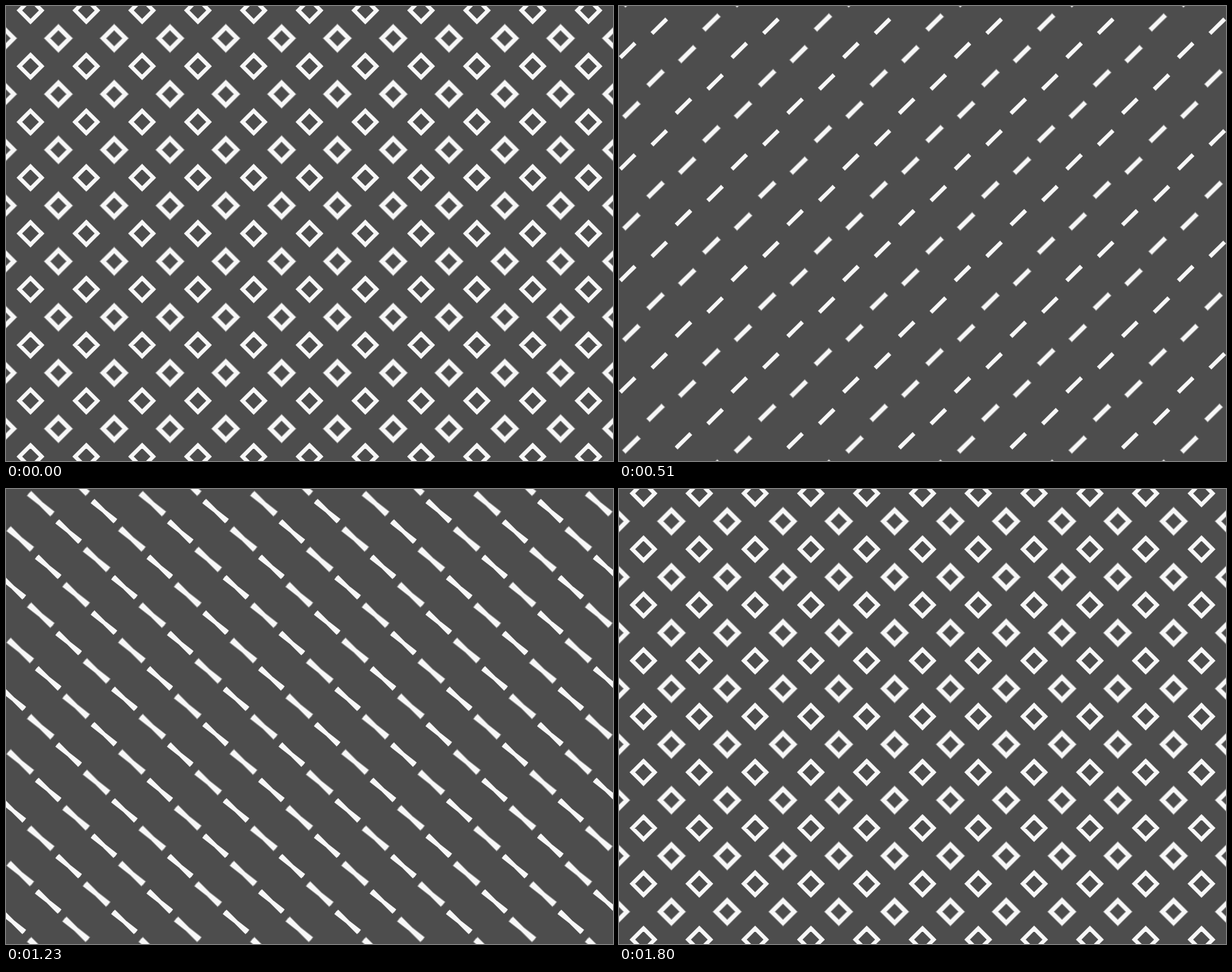
These frames come from a looping animation (800 by 600 pixels, 1830 ms). An HTML page:

```html
<!DOCTYPE html>
<html lang="en">
<head>
<meta charset="utf-8">
<title>Squares and crosses</title>
<style>
  html, body { margin: 0; width: 100%; height: 100%; overflow: hidden; background: #4d4d4d; }
  svg { display: block; width: 100vw; height: 100vh; }
  path { fill: none; stroke: #f7f7f7; stroke-linecap: square; }
</style>
</head>
<body>
<svg viewBox="0 0 800 600">
  <!-- The grid is axis-aligned inside a frame turned by 45 degrees. -->
  <g transform="translate(400 300) rotate(45)">
    <path id="halo" stroke-width="7" stroke-opacity="0.42"/>
    <path id="marks" stroke-width="5.2"/>
  </g>
</svg>
<script>
  const STEP = 30, STEPS = 60, LOOP = STEP * (STEPS + 1);
  const PITCH = 52, ROWS = 11, COLS = 12;
  const SIDE = 10.4, BAR = 10.9, CROSS = 17.65; // half lengths of the centre lines
  const halo = document.getElementById('halo');
  const marks = document.getElementById('marks');

  const ease = x => x < 0.5 ? 4 * x ** 3 : 1 - 4 * (1 - x) ** 3;
  const mix = (a, b, p) => a + (b - a) * p;

  // A line is [x1, y1, x2, y2] around the centre of its mark.
  function box(w, h) {
    return [[-w, -h, -w, h], [w, -h, w, h], [-w, -h, w, -h], [-w, h, w, h]];
  }

  function arm(half, turn) {
    const angle = (turn - 1) * Math.PI / 2;
    const x = half * Math.cos(angle), y = half * Math.sin(angle);
    return [-x, -y, x, y];
  }

  function pose(t) {
    const quarter = Math.min(3, Math.floor(t * 4));
    const p = ease(t * 4 - quarter);
    if (quarter === 0) return box(SIDE * (1 - p), mix(SIDE, BAR, p));
    if (quarter === 1) {
      const half = mix(BAR, CROSS, p);
      return [arm(half, p), arm(half, 0)];
    }
    if (quarter === 2) return [arm(CROSS, 1), arm(CROSS, p)];
    return box(mix(CROSS, SIDE, p), SIDE * p);
  }

  function draw(t) {
    const lines = pose(t);
    let all = '', soft = '';
    for (let row = -ROWS; row <= ROWS; row++) {
      const shift = (row % 2 ? 2 : -2) * t;
      for (let col = -COLS; col <= COLS; col++) {
        const x = (col + shift) * PITCH, y = row * PITCH;
        const d = lines.map(([x1, y1, x2, y2]) =>
          `M${(x + x1).toFixed(2)} ${(y + y1).toFixed(2)}L${(x + x2).toFixed(2)} ${(y + y2).toFixed(2)}`
        ).join('');
        all += d;
        if ((row + col) % 2) soft += d;
      }
    }
    marks.setAttribute('d', all);
    halo.setAttribute('d', soft);
  }

  const start = performance.now();
  let shown = -1;
  function tick() {
    const step = Math.floor((performance.now() - start) % LOOP / STEP);
    if (step !== shown) draw((shown = step) / STEPS);
    requestAnimationFrame(tick);
  }
  tick();
</script>
</body>
</html>
```
